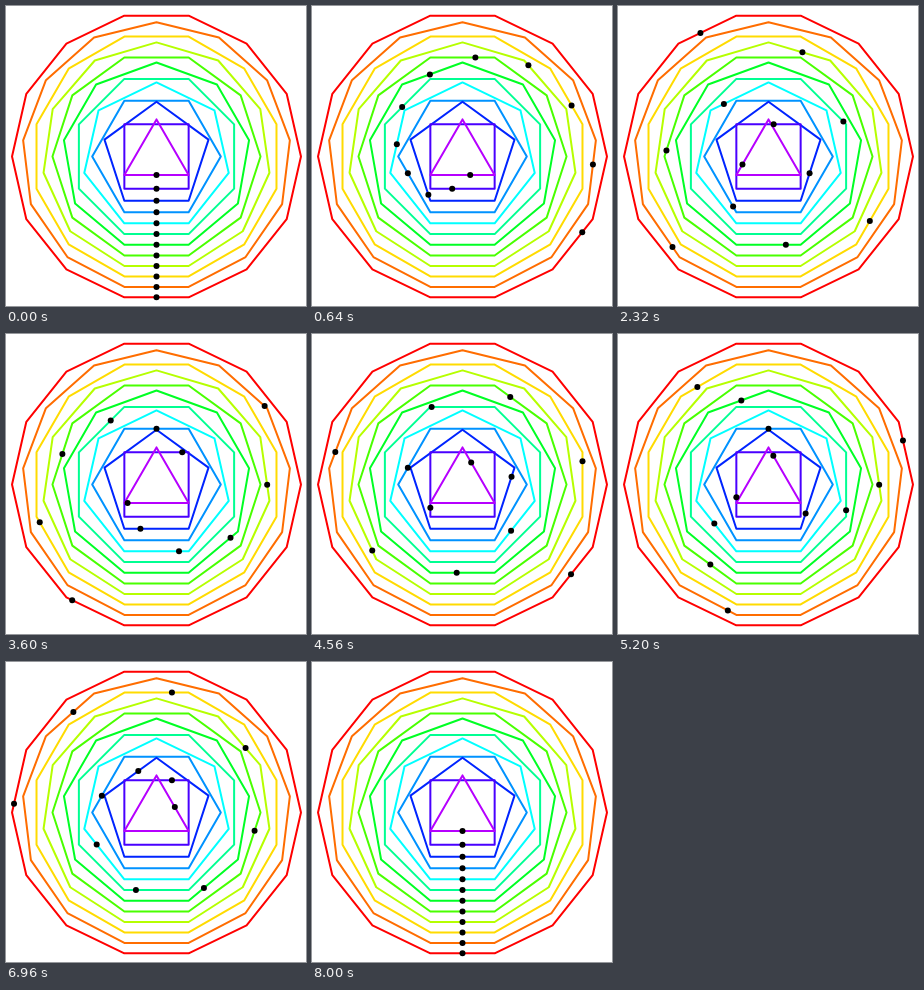
These frames come from a looping animation (300 by 300 pixels, 8080 ms). An HTML page with a canvas:

```html
<!DOCTYPE html>
<html lang="en">
<head>
<meta charset="utf-8">
<title>Polygon rhythm</title>
<style>
  html, body { margin: 0; width: 100%; height: 100%; overflow: hidden; background: #fff; }
  canvas { display: block; width: 100vw; height: 100vh; }
</style>
</head>
<body>
<canvas id="stage" width="300" height="300"></canvas>
<script>
const ctx = document.getElementById('stage').getContext('2d');
const CENTER = 150.5;
const SIDE = 64.3;
const MIN_SIDES = 3;
const MAX_SIDES = 14;
const STEP_MS = 80;
const STEPS = 101;

// Corner i, counted counter-clockwise from the right end of the bottom side.
function corner(n, i) {
  const radius = SIDE / (2 * Math.sin(Math.PI / n));
  const angle = (2 * i + 1) * Math.PI / n;
  return [CENTER + radius * Math.sin(angle), CENTER + radius * Math.cos(angle)];
}

// Point at a fraction of the perimeter, starting at the middle of the bottom side.
function pointAt(n, fraction) {
  const along = fraction * n + 0.5;
  const i = Math.floor(along);
  const part = along - i;
  const [x0, y0] = corner(n, i - 1);
  const [x1, y1] = corner(n, i);
  return [x0 + (x1 - x0) * part, y0 + (y1 - y0) * part];
}

function drawPolygon(n) {
  ctx.beginPath();
  for (let i = 0; i < n; i++) ctx.lineTo(...corner(n, i));
  ctx.closePath();
  ctx.strokeStyle = `hsl(${360 * (1 - n / MAX_SIDES)}, 100%, 50%)`;
  ctx.stroke();
}

function drawDot(n, progress) {
  const laps = MAX_SIDES + 2 - n;
  const [x, y] = pointAt(n, (progress * laps) % 1);
  ctx.beginPath();
  ctx.arc(x, y, 3, 0, 2 * Math.PI);
  ctx.fill();
}

function draw(time) {
  const step = Math.floor(time / STEP_MS) % STEPS;
  const progress = step / (STEPS - 1);
  ctx.fillStyle = '#fff';
  ctx.fillRect(0, 0, 300, 300);
  ctx.lineWidth = 2;
  ctx.lineJoin = 'round';
  for (let n = MAX_SIDES; n >= MIN_SIDES; n--) drawPolygon(n);
  ctx.fillStyle = '#000';
  for (let n = MAX_SIDES; n >= MIN_SIDES; n--) drawDot(n, progress);
}

const start = performance.now();
function tick() {
  draw(performance.now() - start);
  requestAnimationFrame(tick);
}
tick();
</script>
</body>
</html>
```
